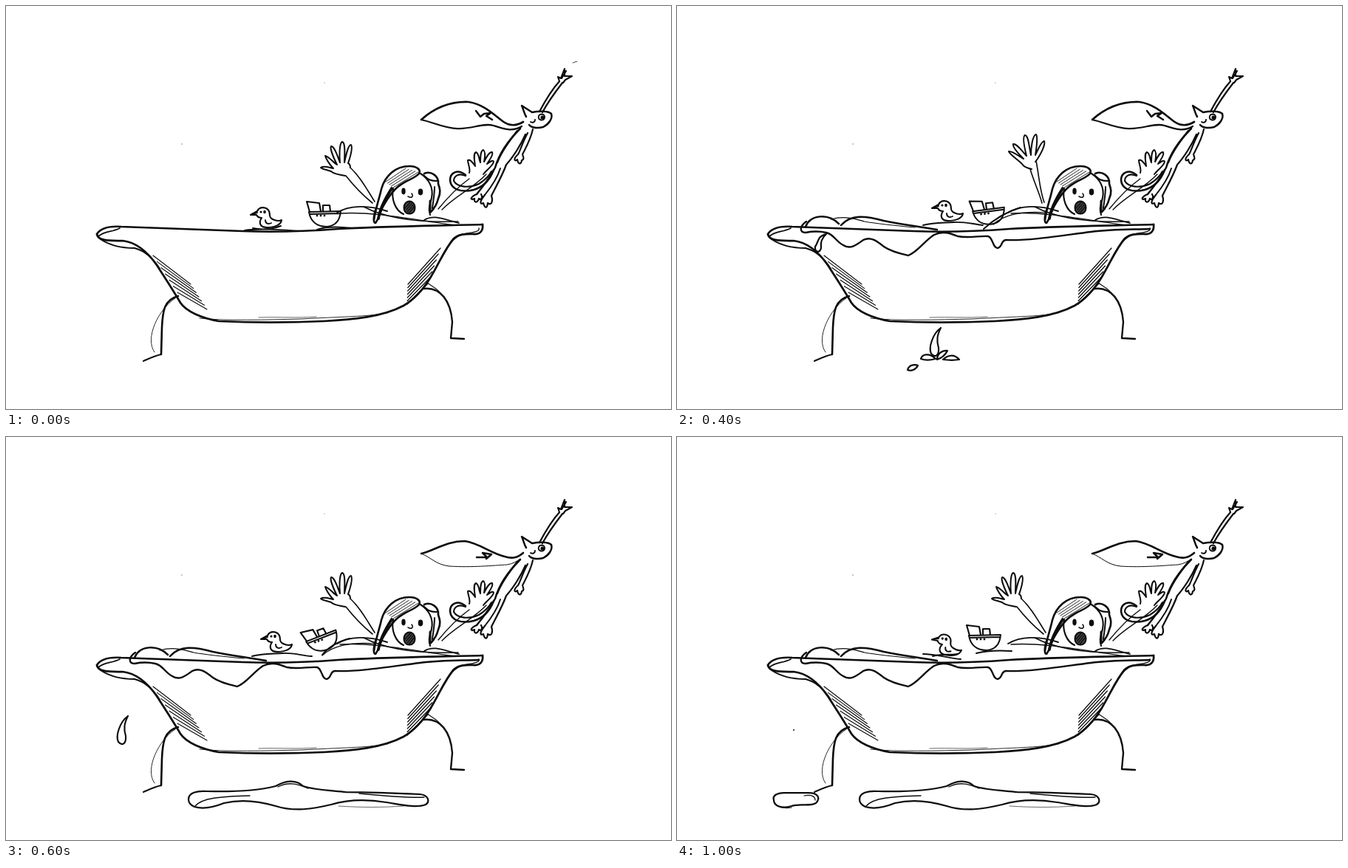
An HTML page with a canvas that plays this animation: 900 by 546 pixels, repeating every 1200 ms.

```html
<!DOCTYPE html>
<html lang="en">
<head>
<meta charset="utf-8">
<title>Bath time</title>
<style>
html, body { margin: 0; width: 100%; height: 100%; overflow: hidden; background: #fff; }
canvas { display: block; width: 900px; height: 546px; }
</style>
</head>
<body>
<canvas id="stage" width="900" height="546"></canvas>
<script>
const ctx = document.getElementById('stage').getContext('2d');
const INK = '#0c0c0c';
const STEP = 200, POSES = 6;
const WEIGHT = 1.25;

function pen(d, width = 2) {
  ctx.lineWidth = width * WEIGHT;
  ctx.stroke(new Path2D(d));
}

function blot(x, y, rx, ry = rx, angle = 0) {
  ctx.beginPath();
  ctx.ellipse(x, y, rx, ry, angle, 0, Math.PI * 2);
  ctx.fill();
}

function at(x, y, deg, draw) {
  ctx.save();
  ctx.translate(x, y);
  ctx.rotate(deg * Math.PI / 180);
  draw();
  ctx.restore();
}

// Strokes blended between a first and a last line [x1, y1, x2, y2]
function hatch(first, last, count, width) {
  for (let i = 0; i < count; i++) {
    const k = i / (count - 1);
    const [a, b, c, d] = first.map((v, j) => v + (last[j] - v) * k);
    pen(`M${a} ${b}L${c} ${d}`, width);
  }
}

function tub() {
  pen('M123 309C128 301 140 298 156 299C200 301 260 303 320 305C370 307 410 305 450 302C500 299 570 298 645 296', 2.1);
  pen('M645 296C646 304 642 309 635 309C624 309 614 308 606 315C594 329 587 347 575 367C563 387 550 399 538 406C510 421 470 425 430 427C385 429 330 429 288 427C265 423 244 414 236 402C225 383 213 365 204 351C190 331 175 320 158 318C142 318 124 319 123 309', 2.2);
  pen('M125 312C134 304 143 307 154 301', 1.4);
  pen('M128 316C140 324 156 328 174 328C189 332 198 341 208 356', 1.6);
  pen('M640 301C642 306 630 307 618 309C604 314 597 327 589 341', 1.1);
  pen('M262 423C300 427 350 425 400 424C450 421 490 421 516 416', .7);
  pen('M342 422C370 421 395 423 420 421', .5);
  hatch([199, 338, 250, 377], [232, 388, 272, 411], 7, .9);
  hatch([588, 328, 544, 377], [571, 376, 543, 404], 7, 1);
  pen('M233 393C214 398 212 413 211 436L210 472', 2.1);
  pen('M210 472C201 474 195 477 186 481', 1.6);
  pen('M229 396C207 410 187 450 201 469', .7);
  pen('M565 383C588 380 602 400 604 428L602 450L620 451', 1.9);
  pen('M569 374C576 380 583 382 588 389', .9);
}

function girl(raised) {
  if (raised) {
    pen('M480 221C474 219 470 219 467 214C460 207 450 201 449 197C454 196 463 204 469 207C463 201 454 191 455 187C460 186 468 198 473 203C471 195 467 177 471 175C476 175 477 195 479 202C479 193 481 175 486 174C489 178 486 195 485 202C488 196 493 183 497 183C499 188 492 201 488 207L485 211', 1.6);
    pen('M478 221C483 238 490 252 494 267M486 210C490 230 491 250 497 266', 1.3);
  } else {
    pen('M459 230C452 228 446 229 440 224C434 222 428 221 426 219C430 216 438 219 443 220C438 215 433 207 432 203C437 204 443 212 448 215C444 207 438 193 440 190C445 190 449 205 452 212C451 203 451 186 455 184C460 185 458 203 458 212C460 203 463 188 467 188C470 193 465 207 463 213C465 214 466 216 466 219', 1.6);
    pen('M460 230C471 244 480 254 496 267M466 219C480 232 488 248 499 265', 1.3);
  }
  // Hair
  pen('M498 290C500 274 505 262 508 248C513 230 527 217 546 217C556 217 562 222 559 227C554 233 543 236 536 241C525 247 515 263 510 272C506 281 503 291 500 294C496 293 498 281 501 274', 2.1);
  pen('M522 247C513 261 506 274 504 288', 3);
  hatch([514, 238, 541, 220], [524, 246, 558, 225], 5, .7);
  pen('M566 227C575 223 586 230 585 241C587 247 589 252 585 261C583 269 579 275 575 279', 2.1);
  pen('M565 229C571 235 574 237 583 237M580 245C580 256 578 265 577 274', 1.6);
  // Face
  pen('M524 247C521 262 527 277 538 282M561 227C572 234 579 246 576 260C574 269 571 274 574 283', 1.7);
  pen('M574 264L574 279', 2.4);
  blot(538, 251, 2.7, 4.4);
  blot(561, 252, 3.3, 4.4);
  pen('M544 258C549 261 552 258 549 254', 1.2);
  ctx.fillStyle = '#444';
  blot(546, 273, 7.4, 8.4);
  ctx.fillStyle = INK;
  pen('M546 264.5C556 265 556 282 546 281.5C536 282 536 265 546 264.5Z', 1.6);
  hatch([540, 274, 547, 266], [545, 281, 553, 271], 4, 1);
  // Right arm and hand
  pen('M585 275C599 258 613 244 627 234M590 276C607 258 632 247 650 228', 1.1);
  pen('M627 226C629 221 625 214 625 209C629 207 632 213 635 217C634 209 632 200 636 198C640 199 640 208 642 212C642 205 642 196 646 195C650 198 648 206 647 211C650 205 654 197 658 198C660 202 654 209 651 214C655 211 659 208 660 211C658 218 650 222 646 228', 1.6);
}

function flyer(capeUp) {
  // Looped tail
  pen('M622 229C611 220 601 226 601 236C602 249 617 253 633 249C647 245 655 235 660 222', 2.1);
  pen('M622 230C613 226 606 230 606 237C611 246 627 247 640 241C648 236 654 230 657 224', 1.7);
  // Raised arm and paw
  pen('M722 143C730 128 738 114 749 102M726 144C734 129 743 117 753 104', 1.8);
  pen('M749 102L747 96L751 98L756 85L756 95L766 95L757 100L754 104M752 98L758 88', 1.7);
  // Head
  pen('M704 150C701 145 700 139 698 135L712 144C722 142 734 142 738 146C740 152 735 160 727 164C719 166 711 165 708 161', 2);
  pen('M710 157C713 159 716 157 716 154', 1.6);
  pen('M725 146.5C731 147 730 155 724 154.5C719 153 720 147 725 146.5Z', 1.5);
  blot(726, 151, 2.6);
  // Body, arm and legs
  pen('M696 166C682 180 668 198 662 219C655 232 646 244 637 255', 2);
  pen('M692 169C681 183 670 198 665 212M703 174C697 188 686 205 677 215C672 229 663 245 657 257', 1.8);
  pen('M669 220C665 233 656 246 648 256', 1.6);
  pen('M713 167C710 181 703 193 699 201M706 172C699 185 696 196 693 201C686 207 688 212 692 208C693 214 697 216 698 209C702 208 700 204 699 201', 1.7);
  pen('M637 255C629 258 627 264 634 261C633 267 638 267 640 261C644 264 645 258 643 255M648 256C642 263 640 270 646 267C648 274 651 275 652 267C658 271 659 263 657 257', 1.8);
  // Cape
  if (capeUp) {
    pen('M562 154C580 138 601 129 626 130C646 133 659 146 672 156C680 162 690 163 700 157', 2.1);
    pen('M562 154C580 158 594 166 611 166C631 167 645 158 660 162C672 166 686 171 698 163', 1.8);
    pen('M636 142L642 150L647 146L656 145L650 149L658 154', 2);
  } else {
    pen('M562 158C580 154 595 141 621 141C641 144 655 157 675 162C685 165 692 164 700 157', 2.1);
    pen('M562 158C575 163 582 173 600 175C630 177 660 174 678 173C686 172 692 168 696 165', .8);
    pen('M637 163L651 163L645 157L657 159L650 165', 2);
  }
}

function duck() {
  pen('M-20 -3L-11 -8C-8 -15 2 -14 5 -8C7 -3 4 0 10 3C14 5 18 6 22 4C21 11 12 14 2 14C-8 14 -9 7 -5 1C-9 1 -11 -1 -12 -3Z', 1.7);
  pen('M-18 -4L-11 -6M0 4C0 9 4 10 8 8', 1.5);
  blot(-6, -7, 1.6);
  blot(-1, -7, 1.8, 2.2);
}

function boat() {
  pen('M-21 0L22 -1C21 11 15 19 3 20C-11 20 -19 12 -21 0M-20 3L21 2', 1.6);
  pen('M-20 0L-24 -14L-7 -12L-5 -1M-2 -1L-2 -9L7 -9L8 -1', 1.7);
  for (const x of [-10, -5, 0]) blot(x, 5, 1.4);
}

function drop(x, y) {
  at(x, y, 0, () => pen('M0 0C-11 8 -17 27 -13 35C-8 41 -2 38 -3 27C-6 17 -5 10 0 0Z', 1.7));
}

function splash(x, y) {
  at(x, y, 0, () => pen('M-20 0C-18 -7 -8 -8 0 0C-7 2 -15 2 -20 0ZM2 1C2 -7 9 -12 16 -11C13 -5 8 -1 2 1M10 1C16 -5 25 -7 32 1C26 2 18 2 10 1ZM-38 15C-36 8 -28 7 -24 9C-27 15 -33 17 -38 15Z', 1.8));
}

function seaBehindGirl() {
  pen('M448 280C464 270 490 269 516 278', 1.5);
  pen('M484 272C507 284 548 294 612 292', 1.2);
  pen('M452 281C500 278 552 290 608 297', 1.1);
  pen('M566 290C579 282 592 289 613 294', 1.4);
}

function leftWaves() {
  pen('M174 299C180 283 204 280 219 295M222 297C235 282 255 284 280 291C310 297 325 298 352 303', 2);
  pen('M208 289C230 283 246 290 254 292C270 295 300 298 322 300', 1);
}

function overflow() {
  pen('M175 292C166 298 165 307 174 307C184 305 193 305 202 307C212 309 215 319 225 324C235 331 245 322 252 317C262 312 270 318 280 326C290 333 304 336 313 338C326 333 335 318 348 310C360 304 370 308 380 312C395 315 410 311 421 312C428 314 427 328 434 328C441 326 438 318 445 317C480 318 520 311 560 306C590 302 615 303 640 302', 1.9);
}

function puddle() {
  pen('M247 491C247 482 258 479 272 480C310 481 345 478 365 473C377 466 392 463 402 473C420 479 445 479 460 481C500 481 540 483 560 484C572 485 574 494 568 498C555 503 535 498 515 495C485 490 460 492 440 498C415 504 390 508 365 500C345 494 320 490 295 496C280 502 265 504 255 501C248 498 247 494 247 491', 1.8);
  pen('M256 500C265 489 290 487 330 486M368 474C384 466 397 471 409 476M478 483C520 487 550 489 566 488', 1.1);
  pen('M450 500C480 502 510 502 538 500', .5);
}

function smallPuddle() {
  pen('M131 492C129 486 135 482 145 482L178 482C192 482 194 490 188 496C180 501 165 496 155 500C142 504 131 500 131 492Z', 1.8);
  pen('M172 486C182 484 187 487 187 492M136 500C142 503 148 503 155 502', 1);
}

// Toy positions [x, y, degrees] and the ripples around them, per pose
const ducks = [[351, 286, 0], [347, 283, 8], [365, 277, 0], [365, 277, 0], [349, 283, 7], [364, 281, 10]];
const boats = [[431, 279, 0], [429, 278, -8], [421, 276, -6], [426, 270, -20], [422, 278, 0], [416, 269, 0]];
const ripples = [
  'M323 304C340 301 370 303 400 305M334 301C350 304 364 301 372 298M421 303C435 298 452 299 468 301',
  'M318 296L338 297M322 301L337 301M360 300L366 304M424 304C440 296 454 293 469 294',
  'M333 297C348 293 360 294 374 293C390 292 398 295 414 297M415 302C428 290 442 280 465 273',
  'M333 297C348 293 360 294 374 293C390 292 398 296 414 297M428 295C437 284 450 277 465 273',
  'M318 296C335 293 350 301 374 294M328 300C342 297 352 301 367 303M413 301C430 297 445 298 460 299',
  'M333 294C350 294 365 299 384 301M346 297C360 293 372 296 380 294M405 293C420 289 438 289 453 290'
];

function render(pose) {
  ctx.fillStyle = '#fff';
  ctx.fillRect(0, 0, 900, 546);
  ctx.fillStyle = ctx.strokeStyle = INK;
  ctx.lineCap = ctx.lineJoin = 'round';

  tub();
  seaBehindGirl();
  girl(pose === 2 || pose === 4);
  flyer(pose % 2 === 0);
  pen(ripples[pose], 1.5);
  at(...ducks[pose], duck);
  at(...boats[pose], boat);

  if (pose > 0) leftWaves();
  if (pose > 1) overflow();
  if (pose > 2) puddle();

  if (pose === 0) pen('M767 77L773 75', .6);
  if (pose === 1) drop(390, 285);
  if (pose === 2) {
    drop(357, 436);
    splash(350, 478);
    pen('M202 309C189 312 192 320 187 326C186 333 193 336 195 328C194 321 196 314 202 309', 1.8);
  }
  if (pose === 2 || pose === 3) pen('M428 296C440 284 465 277 500 280', 1);
  if (pose === 3) drop(165, 378);
  if (pose === 4) splash(155, 488);
  if (pose === 5) smallPuddle();
  if (pose > 3) blot(158, 397, 1);

  ctx.fillStyle = '#aaa';
  blot(431, 104, .8);
  blot(238, 187, .9);
}

let shown = -1;
function tick(now) {
  const pose = Math.floor(now / STEP) % POSES;
  if (pose !== shown) render(shown = pose);
  requestAnimationFrame(tick);
}
tick(performance.now());
</script>
</body>
</html>
```
